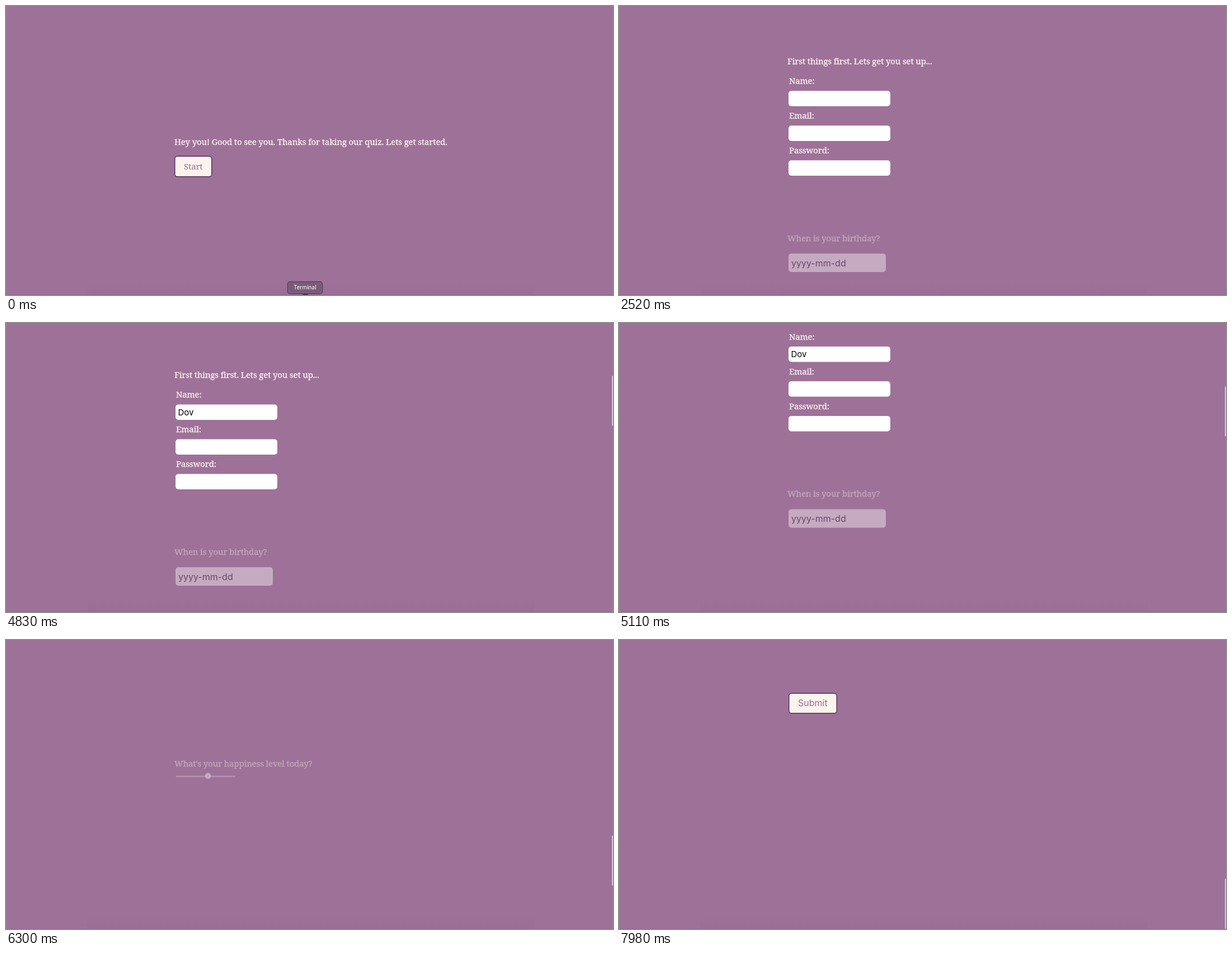
An HTML page that plays this animation: 1085 px wide and 516 px high, repeating every 8 s.

```html
<!DOCTYPE html>
<html lang="en">
<head>
<meta charset="utf-8">
<title>Quiz form</title>
<style>
  html, body { margin: 0; width: 100%; height: 100%; overflow: hidden; background: #9e7199; }
  svg { display: block; width: 100%; height: 100%; }
  text { white-space: pre; }
  .serif { font: 15px "Noto Serif", serif; letter-spacing: -.01em; fill: #fdf4ee; stroke: #fdf4ee; stroke-width: .3px; }
  .label { fill: #96679a; stroke: none; }
  .sans { font: 16px Inter, sans-serif; }
  .small { font: 10px Inter, sans-serif; }
</style>
</head>
<body>
<svg id="stage" viewBox="0 0 1085 516"></svg>
<script>
const LOOP = 8000, STEP = 70, DIM = 0.4;

const text = (x, y, str, cls = 'serif', attrs = '') =>
  `<text x="${x}" y="${y}" class="${cls}" ${attrs}>${str}</text>`;
const box = (x, y, w, h, r, fill, attrs = '') =>
  `<rect x="${x}" y="${y}" width="${w}" height="${h}" rx="${r}" fill="${fill}" ${attrs}/>`;
const group = (id, body) => `<g id="${id}">${body}</g>`;
const dimmed = body => `<g opacity="${DIM}">${body}</g>`;

const button = (x, y, w, h) =>
  box(x + .75, y + .75, w - 1.5, h - 1.5, 4.5, '#fcf4ec', 'stroke="#56305a" stroke-width="1.5"');
const field = (label, y) =>
  text(304, y, label) + box(303, y + 12.5, 182, 27.5, 5, '#fff');
const checkbox = (label, i) =>
  box(303, 1049 + i * 26.8, 10, 10, 2, '#fff') + text(318, 1060 + i * 26.8, label);
const radio = (label, i) =>
  `<circle cx="308" cy="${1353.5 + i * 26.5}" r="5.5" fill="#fff"/>` + text(315, 1356 + i * 26.5, label);

// Autofill list: one row per suggestion, then the "Manage" row.
function suggestions(id, right, emails) {
  const foot = 180 + emails.length * 39.5;
  const rows = emails.map((email, i) => {
    const y = 180 + i * 39.5;
    return text(312, y + 23.5, 'Dovan Ertis', 'small', 'fill="#333"') +
      text(right - 10, y + 23.5, email, 'small', 'fill="#777" text-anchor="end"') +
      box(303, y + 39, right - 303, 1, 0, '#e6e3e6');
  });
  return group(id, box(302.5, 180, right - 302.5, foot - 149.5, 3, '#fff', 'filter="url(#shadow)"') +
    rows.join('') + text(312, foot + 20, 'Manage...', 'small', 'fill="#666"'));
}

const backdrop = `
  <defs>
    <filter id="shadow" x="-5%" y="-10%" width="110%" height="125%">
      <feDropShadow dx="0" dy="1" stdDeviation="1" flood-color="#3a2038" flood-opacity=".55"/>
    </filter>
    <linearGradient id="fade" x2="0" y2="1">
      <stop stop-color="#604058" stop-opacity="0"/><stop offset="1" stop-color="#604058" stop-opacity=".06"/>
    </linearGradient>
  </defs>` +
  box(0, 0, 1085, 516, 0, '#9e7199') + box(0, 0, 1, 516, 0, '#a77ca2') +
  box(145, 490, 800, 26, 8, 'url(#fade)') + box(0, 515, 1085, 1, 0, '#95698f');

const intro = group('intro',
  text(301, 248, 'Hey you! Good to see you. Thanks for taking our quiz. Lets get started.') +
  button(301, 267.5, 67.5, 38) + text(318, 292, 'Start', 'serif label'));

const tooltip = group('tooltip',
  '<path d="M529 514h12l-4 3h-4z" fill="#4e3650"/>' +
  box(503.5, 492.5, 62, 21, 4, '#7a5a79', 'stroke="#4e3650" stroke-width="1.3"') +
  box(504.7, 493.7, 59.6, 18.6, 3, 'none', 'stroke="#8d6d8c" stroke-width=".8"') +
  text(514, 506.3, 'Terminal', 'small', 'fill="#fff"'));

const page = group('page',
  group('account',
    text(301, 104, 'First things first. Lets get you set up...') +
    field('Name:', 139) + field('Email:', 201) + field('Password:', 263) +
    group('ring',
      box(302, 150.5, 184, 29.5, 6, 'none', 'stroke="#8fa8f0" stroke-width="2" opacity=".6"') +
      box(303, 151.5, 182, 27.5, 5, 'none', 'stroke="#4a6ee0" stroke-width="2"')) +
    text(307.5, 170.5, '', 'sans', 'id="typed" style="font-size:15px"') +
    box(336, 156, 1, 18, 0, '#000', 'id="caret"')) +
  dimmed(
    text(301, 419.5, 'When is your birthday?') + box(303, 442, 174, 33, 5, '#fff') +
    text(308, 464.5, 'yyyy-mm-dd', 'sans', 'fill="#1c0f20"') +
    text(301, 723, 'What is your favourite colour?') + box(303, 746, 174, 33, 5, '#fff') +
    text(301, 1026, 'How would you like to hear from us in the future?') +
    ['Send me emails', 'Send me owls', 'Send me SMS'].map(checkbox).join('') +
    text(301, 1326, 'Employment status:') +
    ['Employed', 'Unemployed'].map(radio).join('') +
    text(301, 1627, "What's your happiness level today?") +
    box(303.5, 1643.2, 106.5, 2.6, 1.3, '#d9c6d8') +
    '<circle cx="361" cy="1643.5" r="5.3" fill="#fff"/>') +
  group('submit', button(303, 1917.5, 87, 37) + text(320, 1941.3, 'Submit', 'sans label')));

const stage = document.getElementById('stage');
stage.innerHTML = backdrop + intro + tooltip + page +
  suggestions('longList', 510, ['dovertis@mail.test', 'dovan.ertis@post.test', 'ertis.dovan@letter.test']) +
  suggestions('shortList', 493, ['dovertis@mail.test']) +
  group('status', box(-6, 510, 367.5, 20, 3, '#efe6ee') +
    text(1, 521.5, 'localhost:3000/form#start', 'small', 'fill="#6d5069"')) +
  box(1083, 93, 8, 90, 2, '#d6c8d4', 'id="thumb"');

const el = {};
stage.querySelectorAll('[id]').forEach(node => el[node.id] = node);

const ramp = (t, a, b) => Math.min(1, Math.max(0, (t - a) / (b - a)));
const show = (node, on) => node.setAttribute('display', on ? 'inline' : 'none');
const fade = (node, value) => node.setAttribute('opacity', value);

function track(points, t) {
  let [t0, v0] = points[0];
  for (const [t1, v1] of points) {
    if (t < t1) return v0 + (v1 - v0) * ramp(t, t0, t1);
    [t0, v0] = [t1, v1];
  }
  return v0;
}

const flickStart = [[4760, 0], [4900, 12], [4970, 32], [5040, 64], [5110, 109.5], [5180, 205], [5250, 345], [5320, 510]];
const flickEnd = [[6230, 946], [6300, 1401], [6370, 1564], [6440, 1650], [6510, 1680],
  [6930, 1680], [7000, 1688], [7140, 1724], [7280, 1764], [7420, 1794], [7560, 1813], [7700, 1823]];

function scrollAt(t) {
  if (t < 5320) return track(flickStart, t);
  if (t < 6230) return 946 - 92 * Math.exp((5600 - Math.min(t, 6160)) / 180);
  return track(flickEnd, t);
}

function draw(t) {
  const scroll = scrollAt(t), formOpen = t >= 1750;
  show(el.intro, !formOpen);
  show(el.tooltip, t < 210);
  show(el.page, formOpen);
  el.page.setAttribute('transform', `translate(0 ${-scroll})`);
  fade(el.account, DIM + (1 - DIM) * ramp(t, 1750, 2030));

  fade(el.ring, t < 4200 ? ramp(t, 2520, 2730) : 0);
  el.typed.textContent = 'Dov'.slice(0, (t >= 3080) + (t >= 3290) + (t >= 3570));
  const caretOn = t >= 2590 && t < 4060;
  show(el.caret, caretOn);
  if (caretOn) {
    const width = el.typed.textContent ? el.typed.getComputedTextLength() : 0;
    el.caret.setAttribute('x', 307.5 + width);
    fade(el.caret, t < 3990 ? 1 : .5);
  }
  show(el.longList, t >= 2800 && t < 3150);
  show(el.shortList, t >= 3150 && t < 4200);

  fade(el.status, t < 1680 ? 0 : .75 * (1 - ramp(t, 1680, 2100)));
  fade(el.submit, DIM + (1 - DIM) * ramp(t, 7420, 7770));
  el.thumb.setAttribute('y', 93 + scroll * 0.1827);
  fade(el.thumb, !formOpen ? 0 : t < 4830 ? 1 - ramp(t, 2240, 2520) : 1);
}

function tick(now) {
  draw(Math.floor(now % LOOP / STEP) * STEP);
  requestAnimationFrame(tick);
}
draw(0);
requestAnimationFrame(tick);
</script>
</body>
</html>
```
